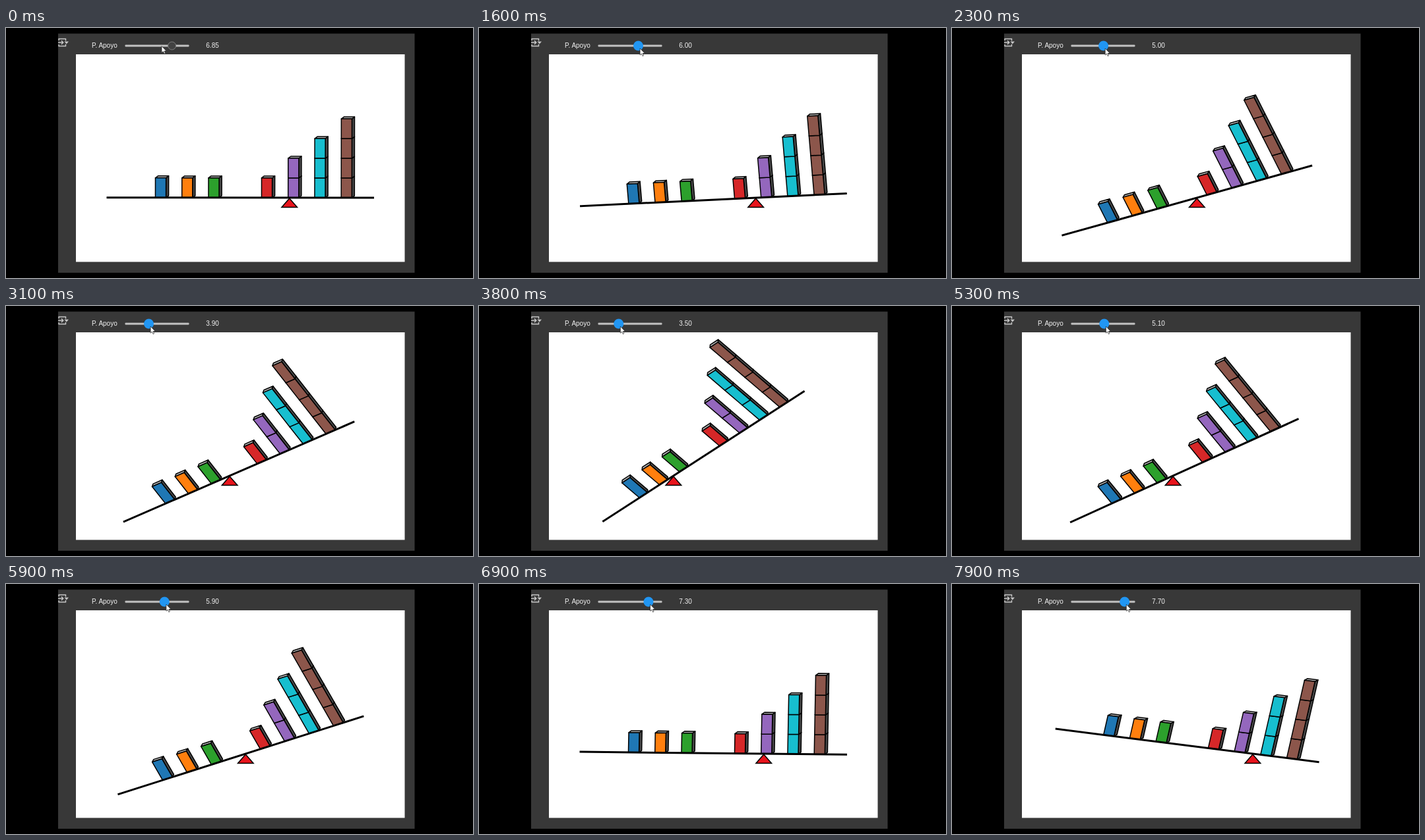
These frames come from a looping animation (708x380 px, 8 s). An HTML page:

```html
<!DOCTYPE html>
<html lang="es">
<head>
<meta charset="utf-8">
<title>Punto de apoyo</title>
<style>
  html, body { margin: 0; width: 100%; height: 100%; overflow: hidden; background: #000; }
  svg { display: block; }
  text { font: 10px "Liberation Sans", Arial, sans-serif; fill: #f2f2f2; }
  #beam * { vector-effect: non-scaling-stroke; }
</style>
</head>
<body>
<svg width="708" height="380" viewBox="0 0 708 380">
  <rect x="79" y="8.5" width="540.5" height="363.5" fill="#383838"/>
  <rect x="106" y="40" width="498.5" height="315.5" fill="#fff"/>
  <g fill="none" stroke="#c8c8c8" stroke-width="1.4">
    <path d="M80 19v-2.5h10.5v3M80 25v2.5h10.5v-3M79 22h7.5M84 19.2l2.8 2.8-2.8 2.8"/>
    <path d="M88.5 20.5h6.5l-3.2 3.8z" fill="#c8c8c8" stroke="none"/>
  </g>
  <text x="130" y="30.3">P. Apoyo</text>
  <text id="value" x="303.3" y="30.3"></text>
  <rect x="180.5" y="25.5" width="97" height="3" rx="1" fill="#c2c2c2"/>
  <circle id="knob" cy="27"/>
  <g id="beam"></g>
  <path id="support" d="M0 1L11.8 14.5H-11.8z" fill="#e8141c" stroke="#000" stroke-width="1.5"/>
  <path id="cursor" d="M0 0v10.2l2.3-2.1 1.6 3.6 1.7-.8-1.6-3.4h3.2z" fill="#fff" stroke="#222" stroke-width=".7"/>
</svg>
<script>
const LOOP = 8000, STEP = 100;
const X0 = 154, Y0 = 258, UX = 40.25, UY = 30;   // axis origin and pixels per unit
const CENTER = 89 / 13;                          // centre of mass of all blocks
const START = 6.85;

// [position, count, colour]
const stacks = [
  [2, 1, '#1f77b4'], [3, 1, '#ff7f0e'], [4, 1, '#2ca02c'], [6, 1, '#d62728'],
  [7, 2, '#9467bd'], [8, 3, '#17becf'], [9, 4, '#8c564b']
];

// [ms, value]
const sliderKeys = [[1200, START], [1600, 6], [3100, 3.9], [3400, 3.5], [4400, 3.5],
  [4700, 4.3], [5900, 5.9], [6900, 7.3], [7900, 7.7]];
const supportKeys = [[1200, START], [1400, 6.75], [1600, 6.6], [2100, 5.65], [3000, 4.7],
  [3100, 4.6], [3800, 3.5], [4400, 3.5], [4700, 3.7], [5300, 4.5], [5900, 5.2],
  [6200, 5.95], [6900, 6.9], [7900, 7.5]];

const $ = id => document.getElementById(id);
const [value, knob, beam, support, cursor] = ['value', 'knob', 'beam', 'support', 'cursor'].map($);

function add(tag, attrs) {
  const el = document.createElementNS('http://www.w3.org/2000/svg', tag);
  set(el, attrs);
  beam.append(el);
}

function set(el, attrs) {
  for (const key in attrs) el.setAttribute(key, attrs[key]);
}

function face(d, fill) {
  add('path', { d, fill, stroke: '#000', 'stroke-width': 1.5, 'stroke-linejoin': 'round' });
}

function build() {
  const w = 0.4 * UX, dx = 0.1 * UX, dy = 0.1 * UY;
  for (const [pos, count, color] of stacks) {
    const x = X0 + pos * UX - w / 2;
    for (let i = 0; i < count; i++) {
      const y = Y0 - i * UY;
      face(`M${x + w} ${y}v${-UY}l${dx} ${-dy}v${UY}z`, '#484848');
      face(`M${x} ${y - UY}l${dx} ${-dy}h${w}l${-dx} ${dy}z`, '#b4b4b4');
      face(`M${x} ${y}v${-UY}h${w}v${UY}z`, color);
    }
  }
  add('path', { d: `M${X0} ${Y0}h${10 * UX}`, stroke: '#000', 'stroke-width': 3, 'stroke-linecap': 'square' });
}

function at(keys, t) {
  if (t <= keys[0][0]) return keys[0][1];
  const i = keys.findIndex(k => k[0] >= t);
  if (i < 0) return keys[keys.length - 1][1];
  const [t0, a] = keys[i - 1], [t1, b] = keys[i];
  return Math.round((a + (b - a) * (t - t0) / (t1 - t0)) * 10) / 10;
}

// Rotation happens in axis units, so it is skewed by the unequal scales.
function tilt(p) {
  const px = X0 + p * UX, angle = Math.atan(0.26 * (CENTER - p));
  const a = Math.cos(angle), s = Math.sin(angle);
  const b = -s * UY / UX, c = s * UX / UY;
  const e = px - a * px - c * Y0, f = Y0 - b * px - a * Y0;
  set(beam, { transform: `matrix(${a} ${b} ${c} ${a} ${e} ${f})` });
  set(support, { transform: `translate(${px} ${Y0})` });
}

function draw(time) {
  const t = Math.floor((time % LOOP + 0.5) / STEP) * STEP;
  const v = at(sliderKeys, t), x = 216.5 + (v - 3.9) * 11.9;
  const active = t >= 900, move = Math.min(t / 400, 1);
  value.textContent = v.toFixed(2);
  set(knob, {
    cx: x, r: active ? 7.5 : 6,
    fill: active ? '#2196f3' : '#424242', stroke: active ? 'none' : '#808080'
  });
  const cx = 236 + (x + 2.6 - 236) * move, cy = 27.5 + 3.5 * move;
  set(cursor, { transform: `translate(${cx} ${cy})` });
  tilt(at(supportKeys, t));
}

build();
const begin = performance.now();
function tick() {
  draw(performance.now() - begin);
  requestAnimationFrame(tick);
}
tick();
</script>
</body>
</html>
```
